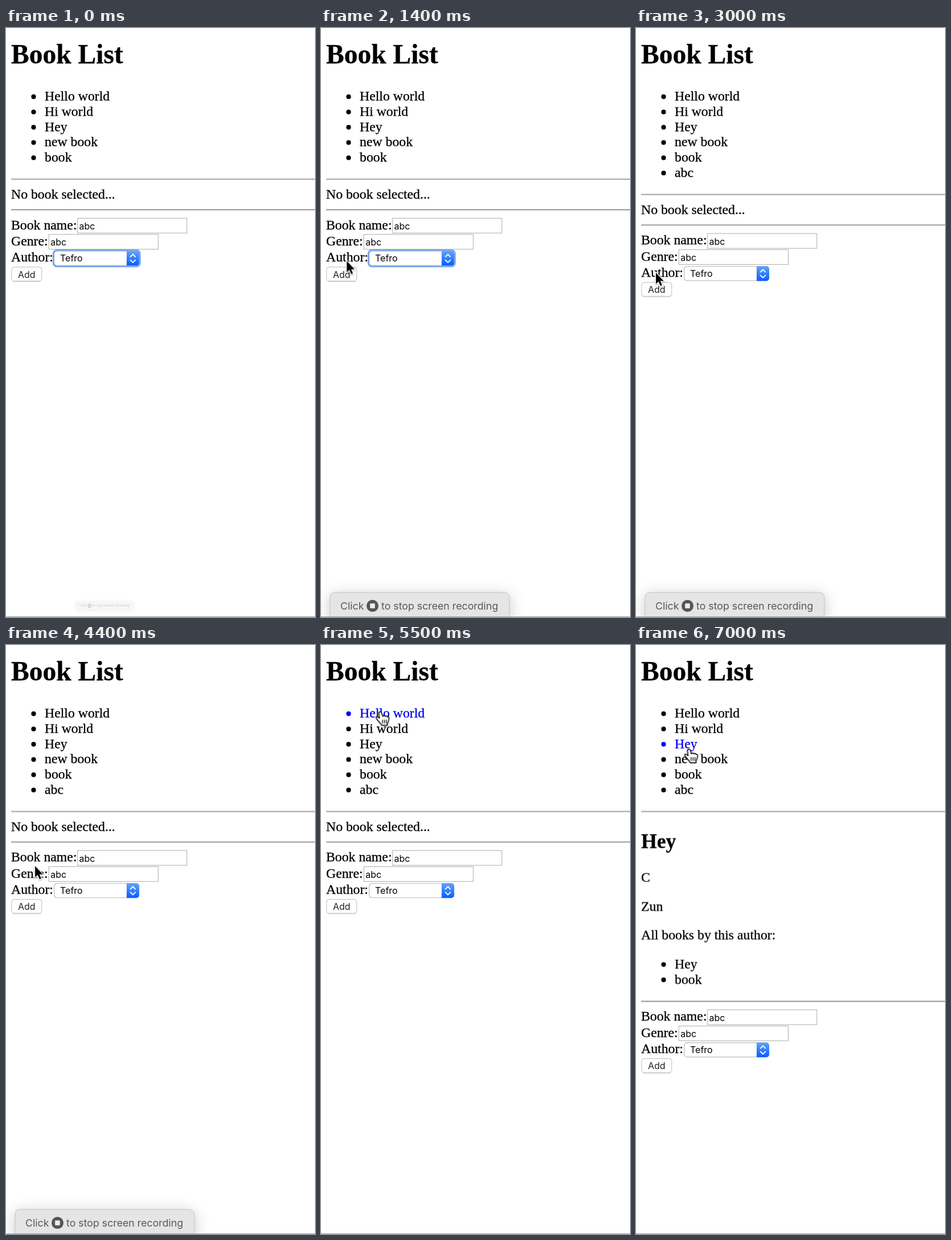
Animation, 543 px wide and 1032 px high, one loop 9.6 s. Source, as an HTML page:

```html
<!DOCTYPE html>
<html lang="en">
<head>
<meta charset="utf-8">
<title>Book List</title>
<style>
  html, body { margin: 0; width: 100%; height: 100%; overflow: hidden; background: #fff; }
  svg { display: block; width: 543px; height: 1032px; color: #000; fill: currentColor; }
  text {
    font-family: "Liberation Serif", "Times New Roman", serif;
    font-size: 23.78px;
    stroke: currentColor;
    stroke-width: .3px;
  }
  .h1 { font-size: 47.56px; font-weight: bold; }
  .h2 { font-size: 35.66px; font-weight: bold; }
  .ui { font-family: Inter, Roboto, sans-serif; font-size: 16px; stroke: none; }
  .hud text { font-family: Inter, Roboto, sans-serif; font-size: 17.75px; fill: #585858; stroke: none; }
  .field { fill: #fff; stroke: #b9b9b9; stroke-width: 1.2; }

  /* One 9.6 s clock for everything; .step parts switch hard */
  .step { animation: 9.6s step-end infinite; }
  .lower { animation-name: lower; }
  .form { animation-name: form; }
  .added { animation-name: added; }
  .message { animation-name: message; }
  .detail { animation-name: detail; }
  .ring { animation-name: ring; }
  .pressed { animation-name: pressed; }
  .arrow { animation-name: arrow; }
  .hand { animation-name: hand; }
  .row1 { animation-name: row1; }
  .row2 { animation-name: row2; }
  .row3 { animation-name: row3; }
  .row4 { animation-name: row4; }
  .row5 { animation-name: row5; }
  .row6 { animation-name: row6; }
  .pointer { animation: move 9.6s linear infinite; }
  .hud {
    transform-origin: 173.5px 1012px;
    filter: drop-shadow(0 5px 13px rgba(0, 0, 0, .22));
    animation: hud 9.6s linear infinite;
  }

  @keyframes lower { 0% { transform: none; } 26.042%, 100% { transform: translateY(26.75px); } }
  @keyframes form { 0% { transform: none; } 70.833%, 100% { transform: translateY(279.15px); } }
  @keyframes added { 0% { opacity: 0; } 26.042%, 100% { opacity: 1; } }
  @keyframes message { 0% { opacity: 1; } 70.833%, 100% { opacity: 0; } }
  @keyframes detail { 0% { opacity: 0; } 70.833%, 100% { opacity: 1; } }
  @keyframes ring { 0% { opacity: 1; } 23.958%, 100% { opacity: 0; } }
  @keyframes pressed { 0%, 26.042%, 100% { opacity: 0; } 23.958% { opacity: 1; } }
  @keyframes arrow { 0%, 48.854%, 100% { opacity: 0; } 1.042% { opacity: 1; } }
  @keyframes hand { 0% { opacity: 0; } 48.854%, 100% { opacity: 1; } }

  /* Rows turn blue while the pointer is over them */
  @keyframes row1 { 0%, 59.698%, 100% { color: #000; } 53.896% { color: #00e; } }
  @keyframes row2 { 0%, 53.896%, 61.771%, 100% { color: #000; } 52.573%, 59.698% { color: #00e; } }
  @keyframes row3 { 0%, 52.573% { color: #000; } 51.51%, 61.771%, 100% { color: #00e; } }
  @keyframes row4 { 0%, 51.51%, 100% { color: #000; } 50.594% { color: #00e; } }
  @keyframes row5 { 0%, 50.594%, 100% { color: #000; } 49.688% { color: #00e; } }
  @keyframes row6 { 0%, 49.688%, 100% { color: #000; } 48.854% { color: #00e; } }

  @keyframes move {
    0%, 1.042% { transform: translate(470px, 262px); }
    5.208% { transform: translate(249px, 293px); }
    10.417% { transform: translate(59px, 380px); }
    17.708%, 44.792% { transform: translate(35px, 428px); }
    45.833% { transform: translate(51px, 387px); }
    48.958% { transform: translate(80px, 262px); }
    52.083% { transform: translate(96px, 170px); }
    54.167% { transform: translate(104px, 128px); }
    55.208% { transform: translate(106px, 120px); }
    58.333% { transform: translate(104px, 116px); }
    63.542%, 100% { transform: translate(93.5px, 183px); }
  }
  @keyframes hud {
    0% { transform: scale(.317); opacity: .3; }
    3.125%, 47.917% { transform: none; opacity: 1; }
    55.208%, 100% { transform: none; opacity: 0; }
  }
</style>
</head>
<body>
<svg viewBox="0 0 543 1032">
  <defs>
    <linearGradient id="blue" x2="0" y2="1">
      <stop stop-color="#62a3fb"/><stop offset="1" stop-color="#0a5cff"/>
    </linearGradient>
    <linearGradient id="press" x2="0" y2="1">
      <stop stop-color="#4088f8"/><stop offset="1" stop-color="#1253e0"/>
    </linearGradient>
    <circle id="dot" cx="48.5" cy="-6.6" r="4.1"/>
    <g id="rule">
      <path d="M9 .8H543" stroke="#888" stroke-width="1.6"/>
      <path d="M9 2.2H543" stroke="#e0e0e0" stroke-width="1.2"/>
    </g>
  </defs>

  <text class="h1" x="9" y="62.2">Book List</text>

  <g class="step row1" transform="translate(0 127)"><use href="#dot"/><text x="68">Hello world</text></g>
  <g class="step row2" transform="translate(0 153.8)"><use href="#dot"/><text x="68">Hi world</text></g>
  <g class="step row3" transform="translate(0 180.5)"><use href="#dot"/><text x="68">Hey</text></g>
  <g class="step row4" transform="translate(0 207.3)"><use href="#dot"/><text x="68">new book</text></g>
  <g class="step row5" transform="translate(0 234)"><use href="#dot"/><text x="68">book</text></g>
  <g class="step added">
    <g class="step row6" transform="translate(0 260.8)"><use href="#dot"/><text x="68">abc</text></g>
  </g>

  <g class="step lower">
    <use href="#rule" y="263.9"/>
    <text class="step message" x="9" y="299.2">No book selected...</text>

    <g class="step detail">
      <text class="h2" x="9" y="328.7">Hey</text>
      <text x="9" y="388.2">C</text>
      <text x="9" y="438.7">Zun</text>
      <text x="9" y="489.2">All books by this author:</text>
      <use href="#dot" y="539.7"/><text x="68" y="539.7">Hey</text>
      <use href="#dot" y="566.5"/><text x="68" y="566.5">book</text>
    </g>

    <g class="step form">
      <use href="#rule" y="317.4"/>
      <text x="9" y="352.6">Book name:</text>
      <rect class="field" x="125.6" y="333.3" width="192.2" height="26"/>
      <text class="ui" x="128.5" y="353">abc</text>

      <text x="9" y="380.8">Genre:</text>
      <rect class="field" x="75.3" y="361.6" width="192.2" height="26"/>
      <text class="ui" x="78.3" y="381.2">abc</text>

      <text x="9" y="409.1">Author:</text>
      <rect class="field" x="84.6" y="391" width="149" height="25" rx="5"/>
      <path d="M212 390.6H229a5 5 0 0 1 5 5V411.4a5 5 0 0 1-5 5H212Z" fill="url(#blue)"/>
      <path d="M218.7 400.8l4.3-4.3 4.3 4.3M218.7 406.6l4.3 4.3 4.3-4.3" fill="none" stroke="#fff" stroke-width="1.9" stroke-linecap="round" stroke-linejoin="round"/>
      <text class="ui" x="95" y="409.3">Tefro</text>
      <rect class="step ring" x="83.3" y="389.3" width="152" height="28.4" rx="6" fill="none" stroke="#7ba7ea" stroke-width="3"/>

      <path d="M12 444.2H61" stroke="#bbb"/>
      <rect class="field" x="9.8" y="418.8" width="53" height="24.6" rx="5" style="stroke:#c8c8c8"/>
      <rect class="step pressed" x="9.3" y="418.3" width="54" height="25.6" rx="5" fill="url(#press)"/>
      <text class="ui" x="21" y="437.5" fill-opacity=".88">Add</text>
    </g>
  </g>

  <g class="hud">
    <rect x="16" y="989" width="315" height="46" rx="8" fill="#e6e5e5" stroke="#c2c2c2"/>
    <text x="34" y="1018.7">Click</text>
    <circle cx="90.5" cy="1012.5" r="10.5" fill="#555"/>
    <rect x="86.2" y="1008.2" width="8.6" height="8.6" rx="1" fill="#eee"/>
    <text x="106" y="1018.7">to stop screen recording</text>
  </g>
  <path d="M0 1031.5H543" stroke="#999"/>

  <g class="pointer" stroke-linejoin="round">
    <path class="step arrow" d="M0 .8V20.5L4.6 16.3 7.8 23.8 10.8 22.5 7.7 15.2H13.8Z" stroke="#fff" stroke-width="3" paint-order="stroke" style="filter:drop-shadow(0 1px 1px rgba(0,0,0,.35))"/>
    <g class="step hand" stroke="#000" stroke-width="1.5" stroke-linecap="round" style="filter:drop-shadow(0 1px 1px rgba(0,0,0,.3))">
      <path d="M-3 2.2C-3-1 1-.8 1.7 1.5L4 8C5 5.5 8 6 8.2 8 9.5 6.2 12 7 12 9 13 8 15 8.5 14.7 11 14.8 15 13.5 17 12 20V23.3H2C1.5 21-1 19.5-3.5 16-5.5 13.5-8.5 11-7.8 9.2-7 7.5-4.5 8.5-2 11Z" fill="#fff"/>
      <path d="M3.4 14V19.5M6.8 14V19.5M10.2 14V19.5" fill="none" stroke-width="1.3"/>
    </g>
  </g>
</svg>
</body>
</html>
```
